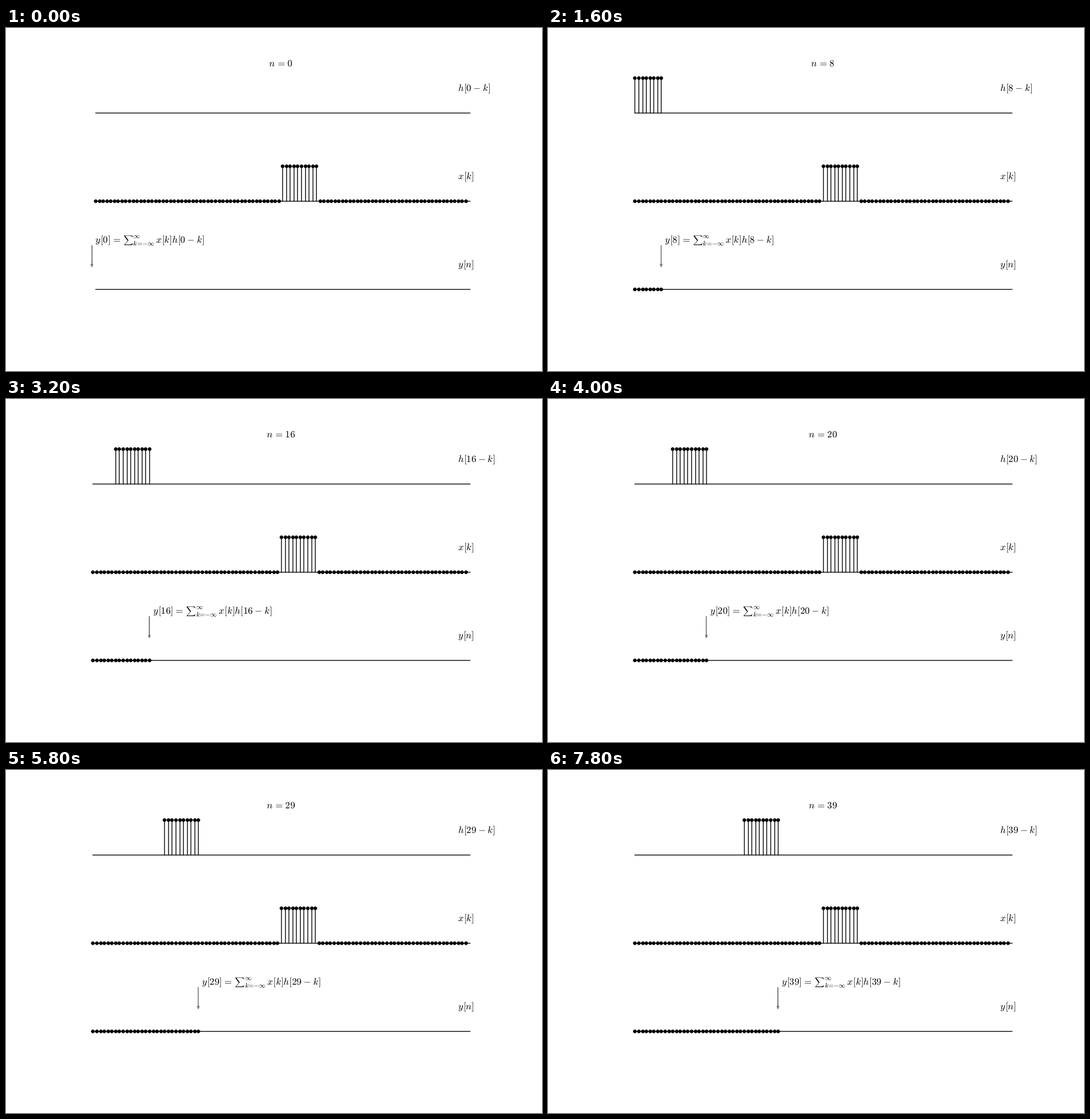
Animation of 935x599 px, one loop 8 s. Source, as a matplotlib script:

```python
import matplotlib.pyplot as plt
from matplotlib.animation import FuncAnimation
from matplotlib.patches import PathPatch
from matplotlib.textpath import TextPath
from matplotlib.transforms import Affine2D

W, H, DPI = 935, 599, 100
FRAMES, STEP_MS = 40, 200
PULSE = 10                      # length of h and of the pulse in x
COUNT, PULSE_START = 100, 50
BASE_H, BASE_X, BASE_Y = 148.4, 302.4, 456.2
UNIT = 61.5                     # pixels per unit of amplitude
EM = 12 * DPI / 72
LABEL_X = 789

plt.rcParams["mathtext.fontset"] = "cm"

# Advance widths in em, italic correction included.
ADVANCE = {"n": 0.600, "h": 0.576, "k": 0.552, "x": 0.572, "y": 0.526,
           "[": 0.278, "]": 0.278, "=": 0.778, "-": 0.778,
           "∞": 1.0, "∑": 1.056}
ADVANCE.update({d: 0.5 for d in "0123456789"})
TEX = {"∞": r"\infty", "∑": r"\sum"}
PADDING = {"=": 0.278, "-": 0.222}
glyphs = {}


def glyph(ch):
    """Outline of one symbol at 1 em, with its origin on the baseline."""
    if ch not in glyphs:
        path = TextPath((0, 0), f"${TEX.get(ch, ch)}$", size=1)
        if ch == "∑":           # inline size: 1 em tall
            path = path.transformed(
                Affine2D().scale(1 / path.get_extents().height))
        box = path.get_extents()
        dx = dy = 0
        if ch in "=-∞∑":
            dx = ADVANCE[ch] / 2 - (box.x0 + box.x1) / 2
        if ch == "∑":
            dy = 0.25 - (box.y0 + box.y1) / 2
        glyphs[ch] = path.transformed(Affine2D().translate(dx, dy))
    return glyphs[ch]


def width(text):
    return EM * sum(ADVANCE[c] + 2 * PADDING.get(c, 0) for c in text)


def write(x, y, text, script=False):
    """Set a formula from x along baseline y and return its right end."""
    size = EM * (0.7 if script else 1)
    for ch in text:
        pad = 0 if script else PADDING.get(ch, 0) * size
        # Each symbol sits on a whole pixel, as in a typeset bitmap.
        place = Affine2D().scale(size, -size).translate(round(x + pad),
                                                        round(y))
        ax.add_patch(PathPatch(glyph(ch).transformed(place),
                               fc="black", lw=0, snap=False))
        x += ADVANCE[ch] * size + 2 * pad
    return x


def stems(xs, base, heights):
    tops = [base - UNIT * v for v in heights]
    for x, top in zip(xs, tops):
        if top < base:
            ax.plot([x, x], [base, top], color="black", lw=1)
    ax.plot(xs, tops, "o", color="black", ms=4, mew=0.5)


def arrow(x):
    ax.add_patch(plt.Polygon(
        [(x, 379.5), (x, 412.5), (x - 1.8, 412.5), (x, 417.3),
         (x + 1.8, 412.5), (x, 412.5)],
        fc="gray", ec="gray", lw=1, joinstyle="miter", snap=False))


def equation(x, y, n):
    x = write(x, y, f"y[{n}]=∑")
    write(x, y - 0.48 * EM, "∞", script=True)
    x = write(x, y + 0.285 * EM, "k=-∞", script=True)
    write(x + 0.217 * EM, y, f"x[k]h[{n}-k]")


def draw(n):
    ax.clear()
    ax.set(xlim=(0, W), ylim=(H, 0))
    ax.axis("off")

    # The view widens slightly while the arrow stands left of zero.
    x0, dx = (156.3, 6.522) if n == 0 else (151.45, 6.571)

    def at(k):
        return x0 + dx * k

    for base in (BASE_H, BASE_X, BASE_Y):
        ax.plot([at(0), at(COUNT)], [base, base], color="black", lw=1)

    window = range(max(0, n - PULSE), n)
    pulse = [int(PULSE_START <= k < PULSE_START + PULSE) for k in range(COUNT)]
    stems([at(k) for k in window], BASE_H, [1] * len(window))
    stems([at(k) for k in range(COUNT)], BASE_X, pulse)
    sums = [sum(pulse[max(0, k - PULSE + 1):k + 1]) / PULSE for k in range(n)]
    stems([at(k) for k in range(n)], BASE_Y, sums)

    arrow(at(n - 1))
    equation(round(at(n)), 375, n)

    title = f"n={n}"
    write(round(479.3 - width(title) / 2), 67, title)
    write(LABEL_X, 110, f"h[{n}-k]")
    write(LABEL_X, 264, "x[k]")
    write(LABEL_X, 418, "y[n]")
    return []


fig = plt.figure(figsize=(W / DPI, H / DPI), dpi=DPI, facecolor="white")
ax = fig.add_axes([0, 0, 1, 1])

anim = FuncAnimation(fig, draw, frames=FRAMES, interval=STEP_MS,
                     init_func=lambda: [], repeat=True, repeat_delay=0)
plt.show()
```
